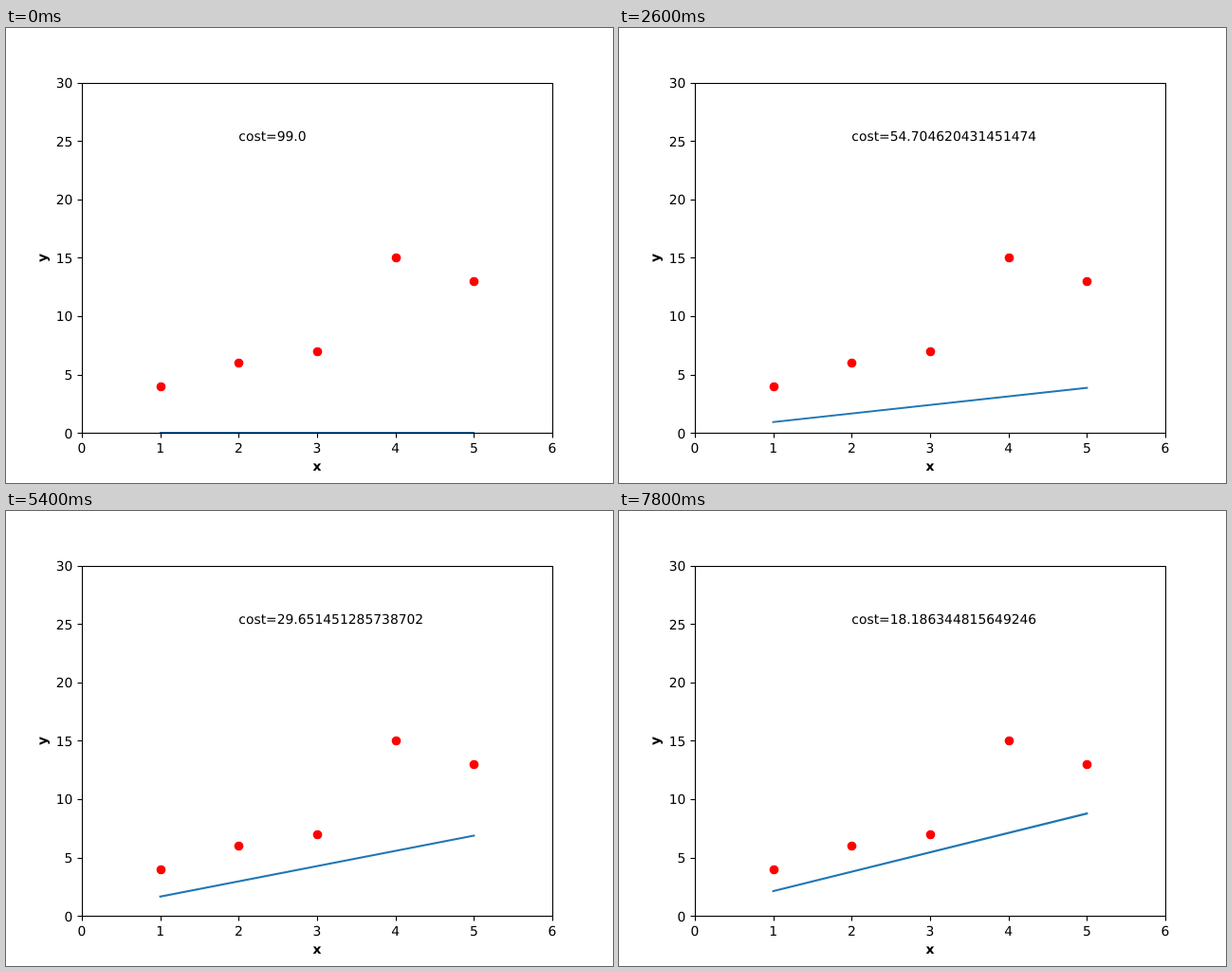
Recreate the animation shown at these times as an HTML page with a canvas. Size 640 by 480 pixels, loop 8000 ms.

```html
<!DOCTYPE html>
<html lang="en">
<head>
<meta charset="utf-8">
<title>Line fit by gradient descent</title>
<style>
  html, body { margin: 0; width: 100%; height: 100%; overflow: hidden; background: #fff; }
  canvas { display: block; }
</style>
</head>
<body>
<canvas id="plot" width="640" height="480"></canvas>
<script>
const ctx = document.getElementById('plot').getContext('2d');
const PT = 100 / 72;
const STEP_MS = 200, STEPS = 40, RATE = 0.001;
const LEFT = 80, RIGHT = 576, TOP = 57.6, BOTTOM = 427.2;
const xs = [1, 2, 3, 4, 5], ys = [4, 6, 7, 15, 13];

const px = x => LEFT + x * (RIGHT - LEFT) / 6;
const py = y => BOTTOM - y * (BOTTOM - TOP) / 30;
const snap = v => Math.round(v) + 0.5;
const sum = list => list.reduce((a, b) => a + b, 0);

// One state per gradient step: slope, intercept and mean squared error
function descend() {
  const n = xs.length, states = [];
  let m = 0, b = 0;
  for (let i = 0; i < STEPS; i++) {
    const err = xs.map((x, k) => ys[k] - (m * x + b));
    states.push({ m, b, cost: (1 / n) * sum(err.map(e => e * e)) });
    const dm = -(2 / n) * sum(err.map((e, k) => xs[k] * e));
    const db = -(2 / n) * sum(err);
    m -= RATE * dm;
    b -= RATE * db;
  }
  return states;
}
const states = descend();

function segment(x1, y1, x2, y2) {
  ctx.beginPath();
  ctx.moveTo(x1, y1);
  ctx.lineTo(x2, y2);
  ctx.stroke();
}

function label(text, x, y, align = 'left', weight = 'normal') {
  ctx.font = `${weight} ${10 * PT}px "DejaVu Sans", sans-serif`;
  ctx.textAlign = align;
  ctx.fillStyle = '#000';
  ctx.fillText(text, x, y);
}

function drawFit({ m, b }) {
  const flat = m === 0;
  const at = x => flat ? [Math.round(px(x)), Math.round(py(b))] : [px(x), py(m * x + b)];
  ctx.save();
  ctx.beginPath();
  ctx.rect(80, 58, 497, 370);
  ctx.clip();
  ctx.strokeStyle = '#1f77b4';
  ctx.lineWidth = 1.5 * PT;
  ctx.lineCap = 'square';
  segment(...at(1), ...at(5));
  ctx.restore();
}

function drawPoints() {
  ctx.fillStyle = '#f00';
  xs.forEach((x, k) => {
    ctx.beginPath();
    ctx.arc(snap(px(x)), snap(py(ys[k])), 3.5 * PT, 0, 2 * Math.PI);
    ctx.fill();
  });
}

function drawAxes() {
  const l = snap(LEFT), r = snap(RIGHT), t = snap(TOP), b = snap(BOTTOM);
  ctx.strokeStyle = '#000';
  ctx.lineWidth = 0.8 * PT;
  ctx.strokeRect(l, t, r - l, b - t);
  for (let x = 0; x <= 6; x++) {
    segment(snap(px(x)), b, snap(px(x)), b + 5);
    label(x, px(x), 448, 'center');
  }
  for (let y = 0; y <= 30; y += 5) {
    segment(l, snap(py(y)), l - 5, snap(py(y)));
    label(y, 70.3, Math.round(py(y) + 5.4), 'right');
  }
  label('x', 328, 467, 'center', 'bold');
  ctx.save();
  ctx.translate(43, 242.4);
  ctx.rotate(-Math.PI / 2);
  label('y', 0, 0, 'center', 'bold');
  ctx.restore();
}

function draw(time) {
  const state = states[Math.floor(time / STEP_MS) % STEPS];
  const cost = Number.isInteger(state.cost) ? state.cost.toFixed(1) : String(state.cost);
  ctx.fillStyle = '#fff';
  ctx.fillRect(0, 0, 640, 480);
  ctx.textRendering = 'geometricPrecision';
  drawPoints();
  drawFit(state);
  drawAxes();
  label('cost=' + cost, 245.3, 119);
}

const start = performance.now();
function tick() {
  draw(performance.now() - start);
  requestAnimationFrame(tick);
}
tick();
</script>
</body>
</html>
```
